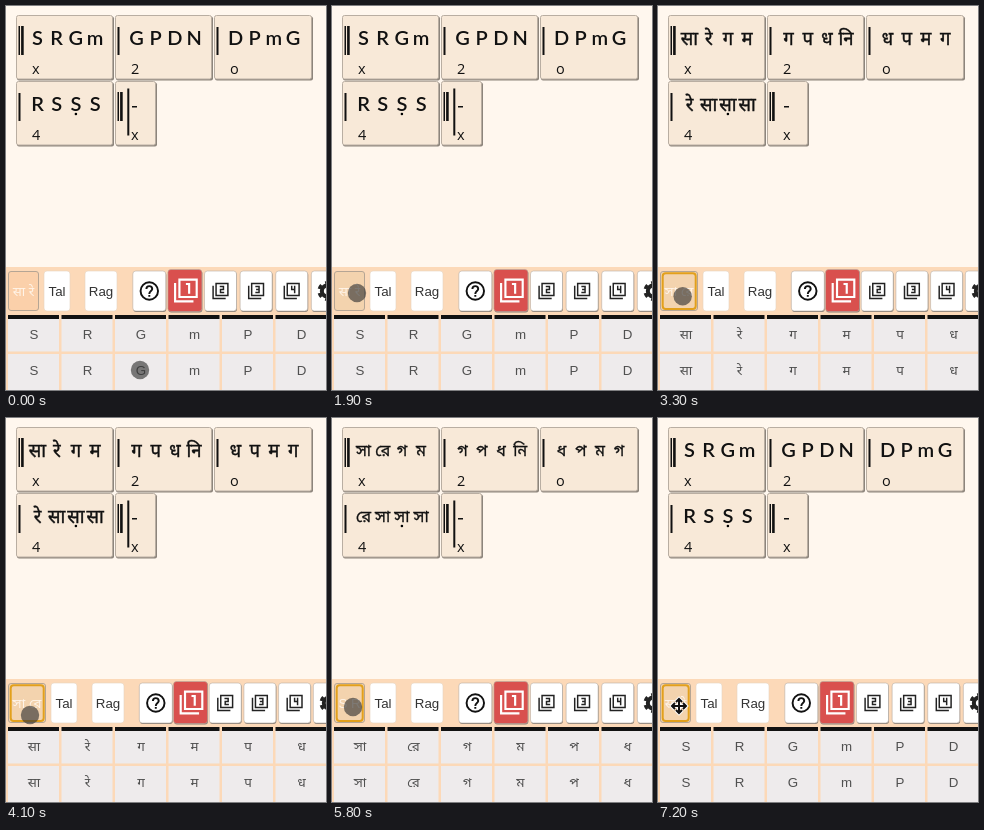
An HTML page that plays this animation: 320x384 px, repeating every 7.3 s.

```html
<!DOCTYPE html>
<html lang="en">
<head>
<meta charset="utf-8">
<title>Notation script switcher</title>
<style>
  html, body { margin: 0; width: 100%; height: 100%; overflow: hidden; background: #fff7ee; }
  svg { display: block; width: 320px; height: 384px; }
  text { font: 13.33px "Liberation Sans", "Noto Sans", "Noto Sans Devanagari", "Noto Sans Bengali", sans-serif; text-anchor: middle; }
  .latin { font: 600 20px Lato, sans-serif; }
  .deva { font: 18.5px "Noto Sans Devanagari", "Noto Sans", sans-serif; stroke: #111; stroke-width: .4; }
  .beng { font: 16px "Noto Sans Bengali", "Noto Sans", sans-serif; stroke: #111; stroke-width: .3; }
  .beat { font: 14.5px "Open Sans", sans-serif; text-anchor: start; }
</style>
</head>
<body>
<svg id="stage" viewBox="0 0 320 384"></svg>
<script>
const LOOP = 7300, STEP = 100;
const INK = '#111', KEY_INK = '#505050';

const scripts = {
  latin: { notes: 'S R G m P D N'.split(' '), label: 'सा रे', base: 29, wide: false },
  deva: { notes: 'सा रे ग म प ध नि'.split(' '), label: 'সা রে', base: 28.5, wide: true },
  beng: { notes: 'সা রে গ ম প ধ নি'.split(' '), label: 'S R', base: 27.5, wide: false }
};
const switches = [[0, 'latin'], [2200, 'deva'], [4400, 'beng'], [6100, 'latin']];

// Note indexes of each bar
const bars = [
  { x: 10, y: 10, w: 97, notes: [0, 1, 2, 3], beat: 'x', double: true },
  { x: 109, y: 10, w: 97, notes: [2, 4, 5, 6], beat: '2' },
  { x: 208, y: 10, w: 98, notes: [5, 4, 3, 2], beat: 'o' },
  { x: 10, y: 76, w: 97, notes: [1, 0, 0, 0], beat: '4', dotted: 2 },
  { x: 109, y: 76, w: 41, notes: [], beat: 'x', double: true }
];

const digits = ['M12 6h3v9', 'M11 6h5v4h-4v4h5', 'M11 6h5v8h-5M12 10h4', 'M12 5v5h4M16 5v10'];

// Pointer stops: time, x, y
const stops = [
  [0, 134, 364], [500, 134, 364], [1600, 25, 287], [2800, 25, 287], [4100, 24, 297],
  [4300, 23, 291], [4500, 23, 291], [4900, 73, 338], [5100, 73, 338], [5700, 21, 289], [7300, 21, 288]
];

const rect = (x, y, w, h, fill, extra = '') =>
  `<rect x="${x}" y="${y}" width="${w}" height="${h}" fill="${fill}" ${extra}/>`;
const text = (x, y, value, cls = '', fill = INK) =>
  `<text x="${x}" y="${y}" class="${cls}" fill="${fill}">${value}</text>`;
const line = (d, color = INK, width = 2) =>
  `<path d="${d}" fill="none" stroke="${color}" stroke-width="${width}"/>`;
const icon = (x, y, scale, body) =>
  `<g transform="translate(${x} ${y}) scale(${scale}) translate(-12 -12)">${body}</g>`;
const latest = (list, t) => list.filter(([start]) => start <= t).pop()[1];

function pointerAt(t) {
  const i = stops.findIndex(([end]) => end > t);
  const [t0, x0, y0] = stops[i - 1], [t1, x1, y1] = stops[i];
  const p = (t - t0) / (t1 - t0), k = p * p * (3 - 2 * p);
  return [x0 + (x1 - x0) * k, y0 + (y1 - y0) * k];
}

function drawBar({ x, y, w, notes, beat, double, dotted }, name) {
  const { notes: names, base } = scripts[name];
  let out = rect(x + 1, y + .5, w, 64, '#8d857c', 'rx="2"')
    + rect(x + .5, y - .5, w - 1, 63.5, '#f8e9d8', 'rx="2" stroke="#b9aea2"');
  out += double
    ? rect(x + 2.5, y + 10, 1.5, 29, INK) + rect(x + 5.1, y + 10, 2.6, 29, INK)
    : rect(x + 2.5, y + 11, 2, 28, INK);
  notes.forEach((n, i) => {
    const cx = x + 21.5 + 19.2 * i;
    out += text(cx, y + base, names[n], name);
    if (i === dotted) out += `<circle cx="${cx}" cy="${y + 32}" r="1.3"/>`;
  });
  if (!notes.length) out += rect(x + 17, y + 24, 5, 1.5, INK);
  return out + text(x + 16, y + 58, beat, 'beat');
}

function drawButton(cx, w, body, fill = '#fff', y = 265, h = 40) {
  return rect(cx - w / 2 + .5, y + 1, w, h, '#8b8178', 'rx="3"')
    + rect(cx - w / 2, y, w, h, fill, 'rx="3" stroke="#b9ada1" stroke-width=".6"') + body;
}

function drawScriptButton(t, { label, wide }) {
  const w = wide ? 37 : 30, focused = t >= switches[1][0], hovered = t >= 1600;
  let out = rect(2.5, 265.5, w, 39, hovered ? '#f3d3ae' : '#fbd0aa', 'rx="2.5" stroke="#b5a594"');
  if (focused) out += rect(4.7, 267.3, w - 4, 35.8, 'none', 'rx="3" stroke="#e2a01c" stroke-width="2"');
  return out + text(2.5 + w / 2, 290, label, '', '#fff4e8');
}

function drawToolbar(t, name) {
  const { wide } = scripts[name];
  const move = wide ? 7 : 0;
  let out = rect(0, 261, 320, 123, '#fcd9b8') + drawScriptButton(t, scripts[name]);
  for (const [cx, w, word] of [[51, 26, 'Tal'], [95, 32, 'Rag']])
    out += rect(cx + move - w / 2, 265, w, 40, '#fff', 'rx="3" stroke="#e6d3c0" stroke-width=".6"')
      + text(cx + move, 290, word, '', '#333');

  const slot = i => 143.3 + 35.6 * i + (wide ? 6.5 - .9 * i : 0);
  out += drawButton(slot(0), 33, icon(slot(0), 285, .97,
    line('M3 12a9 9 0 0 0 18 0a9 9 0 0 0-18 0M9 10a3 3 0 0 1 6 0c0 2-3 2.2-3 5M12 16v2')));
  digits.forEach((d, i) => {
    const cx = slot(i + 1), on = i === 0;
    const pages = line('M2 5v17h17M6 2h16v16H6z' + d, on ? '#fff' : '#222');
    out += drawButton(cx, on ? 34 : 32, icon(on ? cx + 1 : cx, on ? 284.5 : 285, on ? 1.08 : .74, pages),
      on ? '#d9504e' : '#fff', on ? 263.5 : 265, on ? 42 : 40);
  });
  const gx = slot(5);
  return out + drawButton(gx, 32, `<g fill="none" stroke="#222"><circle cx="${gx}" cy="285" r="5.5" stroke-width="4"/>`
    + `<circle cx="${gx}" cy="285" r="8.4" stroke-width="3" pathLength="24" stroke-dasharray="2" stroke-dashoffset="-1"/></g>`);
}

function drawKeys(name) {
  let out = '';
  for (let i = 0; i < 6; i++) {
    const x = 2 + 53.5 * i;
    out += rect(x, 311, 51, 34.5, '#eeebec') + rect(x, 309, 51, 4, INK)
      + rect(x, 348, 51, 36, '#eeebec');
    for (const y of [333, 368.7]) out += text(x + 26, y, scripts[name].notes[i], '', KEY_INK);
  }
  return out;
}

function drawPointer(t) {
  const [x, y] = pointerAt(t);
  if (t < 7100) return `<circle cx="${x}" cy="${y}" r="9.2" fill="#333" fill-opacity=".64"/>`;
  const arrows = 'M-6 0H6M0-6V6M-4-3L-7 0L-4 3M4-3L7 0L4 3M-3-4L0-7L3-4M-3 4L0 7L3 4';
  return `<g transform="translate(${x} ${y})">${line(arrows, '#fff', 4)}${line(arrows)}</g>`;
}

function render(t) {
  const name = latest(switches, t);
  const caret = (t + 350) % 1000 < 500;
  document.getElementById('stage').innerHTML = rect(0, 0, 320, 384, '#fff7ee')
    + bars.map(bar => drawBar(bar, name)).join('')
    + (caret ? rect(121.3, 82.5, 2, 47, INK) : '')
    + drawToolbar(t, name) + drawKeys(name) + drawPointer(t);
}

let shown = -1;
function tick() {
  const t = Math.floor(performance.now() % LOOP / STEP) * STEP;
  if (t !== shown) render(shown = t);
  requestAnimationFrame(tick);
}
tick();
</script>
</body>
</html>
```
